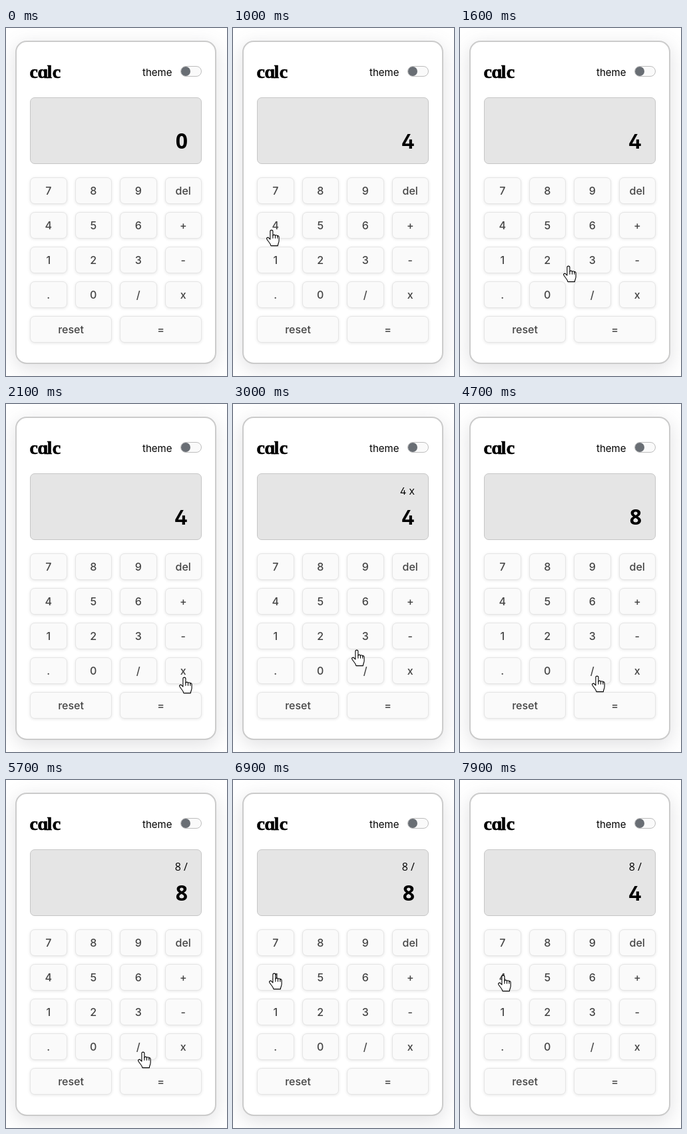
An HTML page for the animation above (8 s loop, 332 by 522 pixels).

```html
<!DOCTYPE html>
<html lang="en">
<head>
<meta charset="utf-8">
<title>Calculator</title>
<style>
  html, body { margin: 0; width: 100%; height: 100%; overflow: hidden; background: #fff; }
  body { position: relative; font-family: Inter, "Open Sans", sans-serif; }
  div, svg { position: absolute; box-sizing: border-box; }
  .card {
    left: 14px; top: 19px; width: 302px; height: 485px;
    background: #fff; border: 2px solid #cbcbcb; border-radius: 17px;
    box-shadow: 0 7px 29px rgba(100, 100, 111, .2);
  }
  .screen {
    left: 36px; top: 104px; width: 258px; height: 100px;
    background: #e5e5e5; border: 1px solid #c6c6c6; border-radius: 7px;
  }
  .switch {
    left: 262px; top: 57px; width: 32px; height: 16px;
    background: #fafafa; border: 1px solid #bdbdbd; border-radius: 8px;
  }
  .knob { left: 0; top: 0; width: 14px; height: 14px; background: #696e74; border-radius: 50%; }
  .key {
    height: 40px; display: flex; align-items: center; justify-content: center;
    font-size: 16px; font-weight: 500; color: #444;
    background: #fafafa; border: 1px solid #e5e5e5; border-radius: 7px;
    box-shadow: 0 1px 4px rgba(0, 0, 0, .1);
  }
  .key.down { background: #f2f2f2; transform: translateY(1px); box-shadow: none; }
  svg { left: 0; top: 0; }
  .logo { font: 700 28px "Liberation Serif", serif; stroke: #000; stroke-width: .6; }
  .theme { font-size: 15px; }
  .past, .now { text-anchor: end; font-family: "Open Sans", "Noto Sans", sans-serif; }
  .past { font-size: 16px; }
  .now { font-size: 32px; font-weight: 700; }
  .four { font-family: Inter, sans-serif; font-size: .94em; font-feature-settings: "cv02"; }
</style>
</head>
<body>
<div class="card"></div>
<div class="screen"></div>
<div class="switch"><div class="knob"></div></div>
<div id="keys"></div>
<svg width="332" height="522" viewBox="0 0 332 522">
  <text class="logo" x="35.5 47.5 61.5 69.7" y="75.3">cɑlc</text>
  <text class="theme" x="205" y="72">theme</text>
  <text class="past" id="past" x="273" y="136"></text>
  <text class="now" id="now" x="273" y="181"></text>
  <g id="hand" stroke="#000" stroke-width="1.1" stroke-linejoin="round" stroke-linecap="round">
    <path fill="#fff" d="M-2.1 14V2.1a2 2 0 0 1 4 0V8.6c0-2 3.4-2 3.6 .3 .2-1.6 3.1-1.5 3.3 .5 .4-1.3 2.3-.9 2.3 1.3V16c0 3.2-1.5 4-1.8 7.6H-1C-1.3 20.6-4.6 18-7 14c-1.3-2.5 1.6-3.8 3-1.8z"/>
    <path fill="none" d="M1.9 8.6v3.6M5.5 8.9v3.3M8.8 9.4v2.8"/>
  </g>
</svg>
<script>
const LOOP = 8000, STEP = 100;
const $ = id => document.getElementById(id);

// time, x, y of the fingertip
const path = [
  [300, 21, 342], [600, 58, 303], [1200, 58, 303], [2000, 268, 410],
  [2500, 268, 410], [3300, 149, 351], [3800, 149, 351], [4100, 224, 434],
  [4200, 224, 434], [4500, 206, 408], [5900, 206, 408], [6800, 62, 290],
  [7300, 62, 290], [7700, 65, 293], [8000, 65, 293]
];
// key, pressed from, released at
const presses = [
  ['4', 800, 1000], ['x', 2300, 2500], ['2', 3600, 3800],
  ['=', 4100, 4200], ['/', 5400, 5600], ['4', 7100, 7300]
];
// time, upper line, main number
const screens = [
  [0, '', '0'], [1000, '', '4'], [2500, '4 x', '4'], [3800, '4 x', '2'],
  [4200, '', '8'], [5600, '8 /', '8'], [7300, '8 /', '4']
];

const keys = {};
function addKey(label, x, y, width) {
  const el = document.createElement('div');
  el.className = 'key';
  el.textContent = label;
  Object.assign(el.style, { left: x + 'px', top: y + 'px', width: width + 'px' });
  $('keys').append(el);
  keys[label] = el;
}
const rows = ['7 8 9 del', '4 5 6 +', '1 2 3 -', '. 0 / x', 'reset ='];
rows.forEach((row, r) => {
  const labels = row.split(' ');
  const width = (258 - 12 * (labels.length - 1)) / labels.length;
  labels.forEach((label, c) => addKey(label, 36 + c * (width + 12), 224 + r * 52, width));
});

const ease = p => (1 - Math.cos(Math.PI * p)) / 2;

function handAt(t) {
  const i = path.findIndex(p => p[0] > t);
  const [t0, x0, y0] = path[i - 1], [t1, x1, y1] = path[i];
  const p = ease((t - t0) / (t1 - t0));
  return [x0 + (x1 - x0) * p, y0 + (y1 - y0) * p].map(Math.round);
}

const markup = s => s.replace(/4/g, '<tspan class="four">4</tspan>');

function draw(t) {
  const [, past, now] = screens.filter(s => s[0] <= t).pop();
  $('past').innerHTML = markup(past);
  $('now').innerHTML = markup(now);

  for (const label in keys) {
    const down = presses.some(([k, from, to]) => k === label && t >= from && t < to);
    keys[label].classList.toggle('down', down);
  }

  const shown = t >= path[0][0];
  $('hand').style.display = shown ? '' : 'none';
  if (shown) $('hand').setAttribute('transform', `translate(${handAt(t)})`);
}

const start = performance.now();
let last = -1;
function tick() {
  const t = Math.floor((performance.now() - start) % LOOP / STEP) * STEP;
  if (t !== last) draw(last = t);
  requestAnimationFrame(tick);
}
tick();
</script>
</body>
</html>
```
